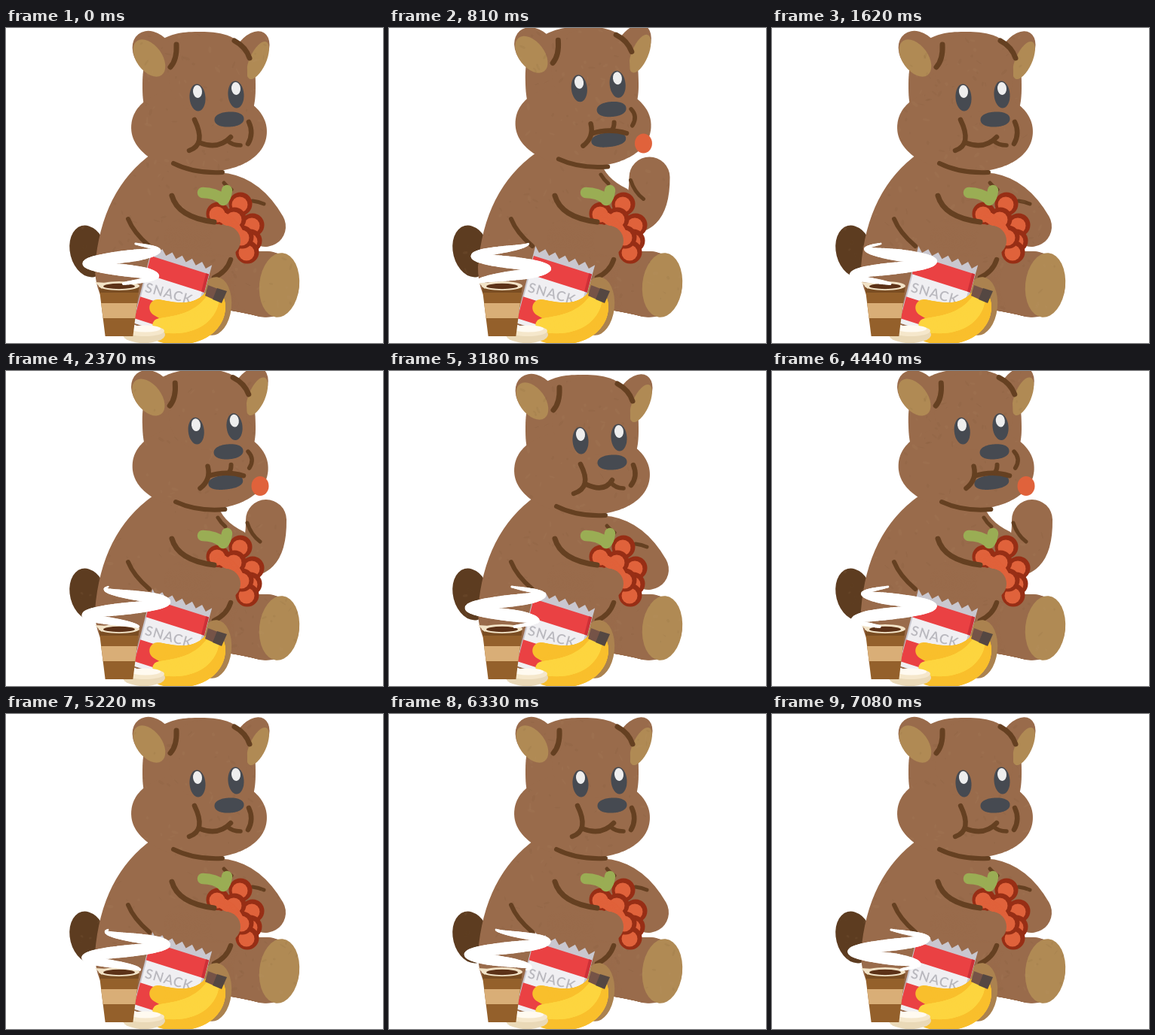
Animation of 500x419 px, one loop 7110 ms. Source, as an HTML page with a canvas:

```html
<!DOCTYPE html>
<html lang="en">
<head>
<meta charset="utf-8">
<title>Snack time</title>
<style>
html, body { margin: 0; width: 100%; height: 100%; overflow: hidden; background: #fff; }
canvas { display: block; width: 500px; height: 419px; }
</style>
</head>
<body>
<canvas id="stage" width="500" height="419"></canvas>
<script>
const g = document.getElementById('stage').getContext('2d');
const LOOP = 7110, CYCLE = LOOP / 2, BITES = [370, 1875];
const FUR = '#996b4b', LINE = '#654021', TAN = '#b08a54', SLATE = '#464a51';
const BERRY = '#e0623b', RIM = '#972e15', GOLD = '#f9bf2c', YELLOW = '#fdd53f';

const lerp = (a, b, k) => a + (b - a) * k;
const quad = (a, b, c, k) => lerp(lerp(a, b, k), lerp(b, c, k), k);
function ease(t, a, b) {
  const k = Math.max(0, Math.min(1, (t - a) / (b - a)));
  return k * k * (3 - 2 * k);
}

function oval(color, x, y, rx, ry = rx, tilt = 0) {
  g.beginPath();
  g.ellipse(x, y, rx, ry, tilt, 0, 7);
  g.fillStyle = color;
  g.fill();
}
// Superellipse: n = 2 is an ellipse, larger n is boxier
function pillow(color, x, y, rx, ry, n, tilt = 0) {
  const pow = v => Math.sign(v) * Math.abs(v) ** (2 / n);
  g.beginPath();
  for (let a = 0; a < 6.28; a += .04) {
    const u = rx * pow(Math.cos(a)), v = ry * pow(Math.sin(a));
    g.lineTo(x + u * Math.cos(tilt) - v * Math.sin(tilt), y + u * Math.sin(tilt) + v * Math.cos(tilt));
  }
  g.fillStyle = color;
  g.fill();
}
function curve(color, w, x0, y0, cx, cy, x1, y1) {
  g.beginPath();
  g.moveTo(x0, y0);
  g.quadraticCurveTo(cx, cy, x1, y1);
  g.strokeStyle = color;
  g.lineWidth = w;
  g.stroke();
}
// Bent sausage whose radius follows k from 0 to 1
function sausage(color, x0, y0, cx, cy, x1, y1, radius) {
  for (let k = 0; k <= 1; k += .02) oval(color, quad(x0, cx, x1, k), quad(y0, cy, y1, k), radius(k));
}
function poly(color, ...p) {
  g.beginPath();
  for (let i = 0; i < p.length; i += 2) g.lineTo(p[i], p[i + 1]);
  g.closePath();
  g.fillStyle = color;
  g.fill();
}

// Milliseconds into the current bite, or -1 while resting
function biteTime(t) {
  const c = t % CYCLE, b = c - (c < BITES[1] ? BITES[0] : BITES[1]);
  return b > 0 && b < 900 ? b : -1;
}
function chewAt(t) {
  const c = t % CYCLE;
  const wave = (a, z) => c > a && c < z ? .5 - .5 * Math.cos((c - a) / 240 * 2 * Math.PI) : 0;
  return wave(1350, 1590) + wave(1680, 1920) + wave(2820, 3540);
}
function handAt(b) {
  const go = (x, y, to, a, z) => { const k = ease(b, a, z); return [lerp(x, to[0], k), lerp(y, to[1], k)]; };
  const rest = [344, 264], out = [390, 238], up = [345, 198], back = [374, 240];
  if (b < 305) return go(...rest, out, 0, 305);
  if (b < 660) return go(...out, up, 305, 450);
  if (b < 780) return go(...up, back, 660, 780);
  return go(...back, rest, 780, 890);
}

function drawBody() {
  oval('#5d3c20', 109, 297, 24, 35, -.25);
  sausage(FUR, 295, 338, 320, 338, 346, 341, k => 37 + 7 * k);
  oval(TAN, 362.5, 342, 26.5, 43, .1);
  g.beginPath();
  g.moveTo(195, 166);
  g.quadraticCurveTo(240, 150, 280, 175);
  g.quadraticCurveTo(286, 200, 316, 214);
  g.quadraticCurveTo(360, 265, 294, 318);
  g.quadraticCurveTo(270, 398, 180, 398);
  g.quadraticCurveTo(118, 380, 118, 318);
  g.quadraticCurveTo(126, 215, 195, 166);
  g.fillStyle = FUR;
  g.fill();
}

function drawArm([x, y], raised) {
  const lift = (264 - y) / 66;
  curve(FUR, 54, lerp(290, 303, lift), lerp(220, 241, lift), lerp(322, 346, lift), lerp(226, 262, lift), x, y);
  if (raised) {
    curve(LINE, 5, x - 25, y + 4, x - 20, y + 20, x - 8, y + 29);
    curve(LINE, 5, 281, 195, 285, 202, 291, 207);
  } else {
    curve(LINE, 5, 289, 206, 293, 211, 299, 215);
    curve(LINE, 5, 327, 230, 335, 231, 342, 234);
  }
}

function drawHead() {
  pillow(FUR, 256, 77, 75, 72, 2.6);
  pillow(FUR, 256, 135, 90, 56, 2.1, .06);
  oval(FUR, 196, 34, 33, 25, .9);
  oval(TAN, 190, 40, 28, 17, .95);
  oval(FUR, 324, 35, 34, 21, -1);
  oval(TAN, 334, 43, 27, 11, -1.15);
  pillow(FUR, 268, 60, 52, 52, 2.4);
}

function drawMarks() {
  curve(LINE, 7, 226, 22, 227, 42, 218, 52);
  curve(LINE, 7, 303, 17, 318, 25, 323, 40);
  curve(LINE, 6, 222, 180, 250, 194, 287, 192);
}

function drawFace(open, chew) {
  for (const [x, y] of [[254, 92.5], [305, 88.5]]) {
    oval(SLATE, x, y, 10.5, 18, -.07);
    oval('#eee', x, y - 8, 6, 8.5, -.1);
  }
  pillow(SLATE, 296, 121.5, 19.5, 10, 2.2, -.05);
  const s = chew * 4;
  if (open) {
    pillow(SLATE, 291, 162, 23, 9.5, 2.3, -.08);
    curve(LINE, 6.5, 268, 140, 272, 158, 257, 169);
    curve(LINE, 6.5, 269, 153, 292, 146, 315, 154);
    curve(LINE, 6, 299, 139, 299, 146, 295, 150);
    curve(LINE, 5.5, 322, 122, 331, 132, 323, 144);
  } else {
    curve(LINE, 6.5, 250 + s, 122 + s / 2, 266 + s, 155, 243 + s / 2, 163);
    curve(LINE, 6.5, 258 + s, 153 - s / 2, 282 + s, 162, 298 - s / 2, 145);
    curve(LINE, 5.5, 294, 150 - s / 2, 300, 156, 311, 156);
    curve(LINE, 6.5, 322 + s / 2, 125, 329 + s / 3, 140, 321, 154 - s / 2);
  }
}

function drawFruit() {
  const spots = [[327, 262], [324, 283], [320, 298], [311, 234], [281, 247], [303, 254], [313, 278]];
  for (const [x, y] of spots) {
    oval(RIM, x, y, 15.5);
    oval(BERRY, x - 1, y + 1, 10.5);
  }
  sausage(BERRY, 282, 249, 303, 260, 308, 274, () => 7);
  sausage(FUR, 235, 278, 265, 282, 292, 283, k => 25 - 5 * k);
  curve(LINE, 7, 220, 223, 228, 252, 276, 258);
  curve(LINE, 6, 162, 254, 169, 272, 190, 290);
  curve(LINE, 6.5, 298, 308, 293, 324, 276, 332);
  curve('#9aad54', 14.5, 261, 219, 277, 219, 288, 228);
  curve('#9aad54', 14.5, 288, 229, 292, 225, 293, 216);
}

// Faint paper grain on the fur
function grain(seed) {
  let s = seed * 7919 + 17;
  const rnd = () => (s = (s * 16807) % 2147483647) / 2147483647;
  g.save();
  g.globalCompositeOperation = 'source-atop';
  rnd();
  for (let i = 0; i < 260; i++) {
    const x = 85 + rnd() * 305, y = rnd() * 390;
    const color = rnd() < .6 ? 'rgba(90,45,25,.06)' : 'rgba(205,160,120,.07)';
    oval(color, x, y, 1 + rnd() * 4, .6 + rnd() * 1.5, rnd() * 3);
  }
  g.restore();
}

function drawBag() {
  oval('#ab824f', 276, 370, 23, 39, .1);
  // Local frame: x along the top edge, y down the side
  g.save();
  g.transform(.94, .3, -.25, .97, 194, 291);
  g.beginPath();
  for (let i = 0; i <= 12; i++) g.lineTo(i * 7, i % 2 ? 6 : -1);
  g.lineTo(82, 104);
  g.lineTo(0, 104);
  g.fillStyle = '#c9c7cf';
  g.fill();
  g.fillStyle = '#f0eff2';
  g.fillRect(2, 34, 78, 70);
  g.fillStyle = '#ea4143';
  g.fillRect(1, 12, 82, 25);
  g.fillRect(1, 68, 78, 30);
  g.fillStyle = '#cc3037';
  g.fillRect(79, 12, 4, 25);
  g.restore();
  g.save();
  g.translate(216, 354);
  g.rotate(.27);
  g.font = '600 18px Lato, "Open Sans", sans-serif';
  g.letterSpacing = '1px';
  g.textAlign = 'center';
  g.textBaseline = 'middle';
  g.fillStyle = '#b9b8be';
  g.fillText('SNACK', 0, 0);
  g.restore();
}

function drawBananas() {
  const belly = (r, tip) => k => tip + (r - tip) * Math.sin(k * Math.PI) ** .6;
  sausage(GOLD, 274, 358, 254, 394, 199, 371, belly(15, 10));
  sausage(GOLD, 279, 361, 275, 407, 203, 407, belly(18, 9));
  sausage(YELLOW, 274, 361, 259, 398, 201, 395, belly(13, 8));
  poly('#755347', 268, 342, 281, 347, 275, 361, 264, 356);
  poly('#544742', 280, 346, 293, 350, 286, 366, 274, 361);
}

function drawCup() {
  oval('#ead9b7', 183, 408, 28, 11);
  oval('#f5e7cb', 184, 403, 26, 7);
  oval('#fffaf0', 185, 400, 20, 4.5);
  const wall = (color, top, bottom) => {
    const half = y => 26.5 - (y - 345) * .125;
    poly(color, 150 - half(top), top, 150 + half(top), top, 150 + half(bottom), bottom, 150 - half(bottom), bottom);
  };
  wall('#94602b', 345, 410);
  wall('#d9ae77', 366, 386);
  wall('#7a4d22', 345, 352);
  oval('#f2e3c7', 150, 343, 27, 6);
  poly('#f2e3c7', 118, 338, 133, 339, 127, 347);
  oval('#5c3218', 150, 343.5, 21, 3.7);
}

// A rising zigzag whose sway grows and shrinks with height
function drawSteam(t) {
  const gap = 37.5, left = 313 - t / (LOOP / 20) % 1 * gap;
  const angle = y => (y - left) / gap * 2 * Math.PI;
  const at = y => {
    const sway = Math.max(20, 55 - .036 * (y - 315) ** 2);
    return 150 + Math.min(12, (341 - y) * .36) - sway * Math.cos(angle(y));
  };
  g.strokeStyle = '#fff';
  for (let y = 287; y < 340; y += .5) {
    const fade = Math.min(1, (y - 286) / 16, (342 - y) / 16);
    g.lineWidth = 2 + fade * (4 + 10 * Math.abs(Math.sin(angle(y))));
    g.beginPath();
    g.moveTo(at(y), y);
    g.lineTo(at(y + .5), y + .5);
    g.stroke();
  }
}

function draw(t) {
  const b = biteTime(t), hand = handAt(b);
  const nod = ease(b, 320, 460) * (1 - ease(b, 650, 820));
  const withHead = paint => {
    g.save();
    g.translate(256 + 1.5 * nod, 130 - 7 * nod);
    g.rotate(-.03 * nod);
    g.translate(-256, -130);
    paint();
    g.restore();
  };
  g.clearRect(0, 0, 500, 419);
  g.lineCap = g.lineJoin = 'round';
  drawBody();
  drawArm(hand, b > 200 && b < 790);
  withHead(drawHead);
  grain(Math.floor(t / 120) % 4 + 1);
  withHead(() => {
    drawMarks();
    g.translate(-2 * nod, -6 * nod);
    drawFace(nod > .4, chewAt(t));
  });
  drawFruit();
  if (b > 150 && b < 620) {
    const k = ease(b, 150, 450);
    oval(BERRY, hand[0] - lerp(28, 8, k), hand[1] - lerp(6, 45, k), 11.5, 13);
  }
  drawBag();
  drawBananas();
  drawCup();
  drawSteam(t);
}

const start = performance.now();
function tick(now) {
  draw(Math.max(0, now - start) % LOOP);
  requestAnimationFrame(tick);
}
draw(0);
requestAnimationFrame(tick);
</script>
</body>
</html>
```
